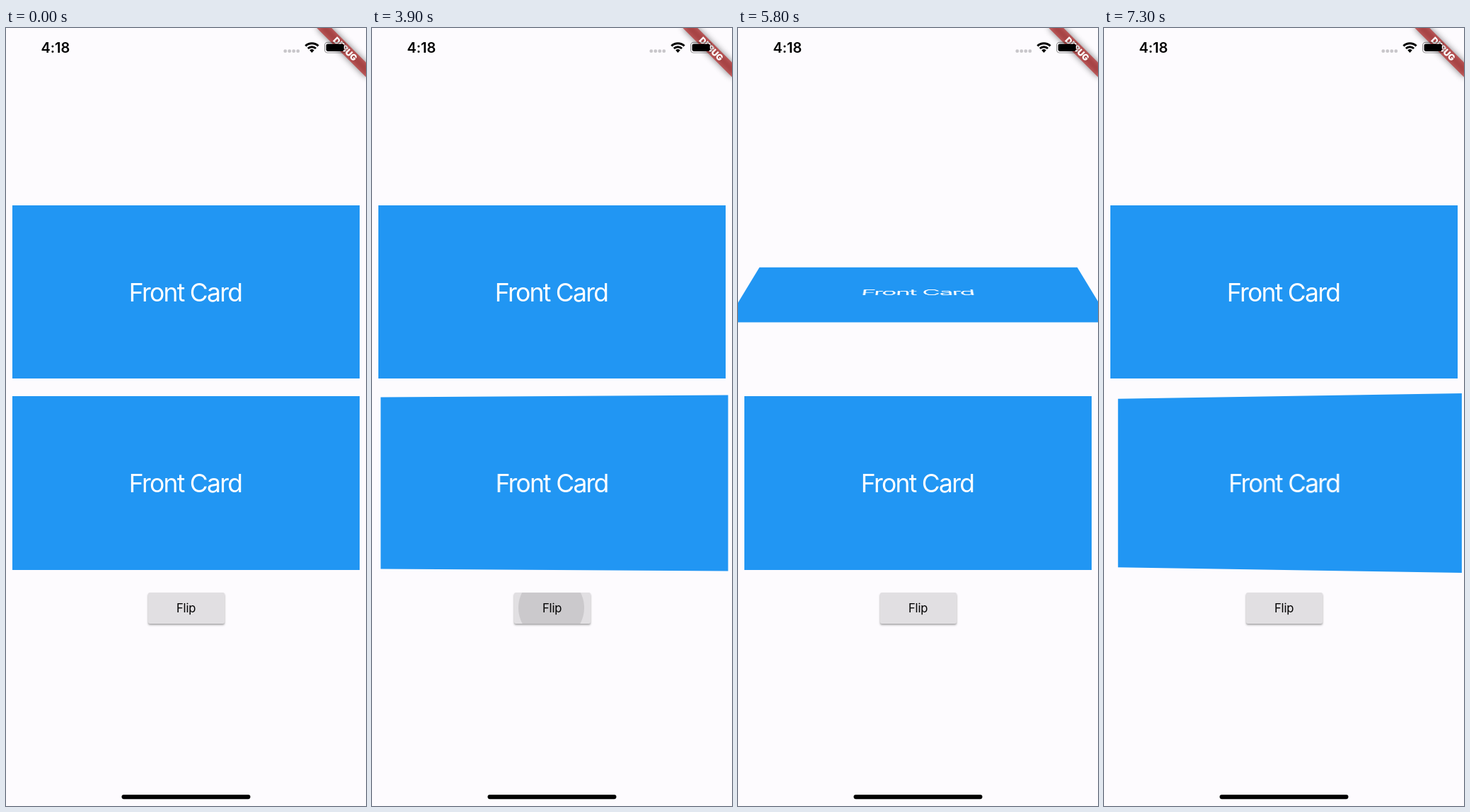
An HTML page for the animation above (7400 ms loop, 509 px wide and 1101 px high).

```html
<!DOCTYPE html>
<html lang="en">
<head>
<meta charset="utf-8">
<title>Flip cards</title>
<style>
  html, body { margin: 0; width: 100%; height: 100%; overflow: hidden; background: #fdfbfe; }
  body { position: relative; font-family: Inter, "Open Sans", sans-serif; }
  svg { position: absolute; left: 0; top: 0; }
  .card {
    position: absolute; left: 8.6px; width: 491.8px; height: 245.8px;
    background: #2196f3; color: #fff; text-align: center;
    font-size: 35.5px; line-height: 247.6px; letter-spacing: -1.75px; text-indent: -2px;
  }
  #top { top: 250.7px; }
  #bottom { top: 521px; }
  #button {
    position: absolute; left: 200.5px; top: 798.6px; width: 108.2px; height: 44.2px;
    border-radius: 2.5px; background: #e1dfe2; overflow: hidden;
    box-shadow: 0 2px 3px rgba(0, 0, 0, .28), 0 1px 2px rgba(0, 0, 0, .12);
    color: #000; text-align: center; font-size: 16.6px; line-height: 44.4px; letter-spacing: -.2px;
  }
  #button span { position: relative; }
  #ripple { position: absolute; left: 53px; top: 22px; border-radius: 50%; background: #000; }
</style>
</head>
<body>
<div class="card" id="top">Front Card</div>
<div class="card" id="bottom">Front Card</div>
<div id="button"><div id="ripple"></div><span>Flip</span></div>

<svg width="509" height="1101" viewBox="0 0 509 1101">
  <defs>
    <filter id="blur" x="-30%" y="-200%" width="160%" height="500%">
      <feGaussianBlur stdDeviation="4.6"/>
    </filter>
  </defs>
  <g transform="translate(509 0) rotate(45)">
    <rect x="-49.2" y="34.4" width="98.4" height="14.8" opacity=".5" filter="url(#blur)"/>
    <rect x="-49.2" y="34.4" width="98.4" height="14.8" fill="#b71c1c" fill-opacity=".63"/>
    <text y="46.2" font-size="12.3" font-weight="900" fill="#fff" text-anchor="middle" letter-spacing="-.2">DEBUG</text>
  </g>
  <text x="49.6" y="35" font-size="20" font-weight="600" letter-spacing="-.1">4:18</text>
  <g fill="#c8c6ca">
    <circle cx="394.8" cy="32.7" r="2.4"/>
    <circle cx="400.8" cy="32.7" r="2.4"/>
    <circle cx="406.8" cy="32.7" r="2.4"/>
    <circle cx="412.8" cy="32.7" r="2.4"/>
  </g>
  <g transform="translate(432.5 35)" fill="none" stroke="#000" stroke-width="3">
    <path d="M-9.1 -9.7A13.3 13.3 0 0 1 9.1 -9.7"/>
    <path d="M-5.6 -6A8.2 8.2 0 0 1 5.6 -6"/>
    <path d="M0 0L-3.2 -3.4A4.7 4.7 0 0 1 3.2 -3.4Z" fill="#000" stroke="none"/>
  </g>
  <rect x="450.6" y="20.4" width="29.4" height="14.6" rx="4" fill="none" stroke="#000" stroke-opacity=".4" stroke-width="1.2"/>
  <path d="M481.6 25.4q2.2 2.3 0 4.6z" fill-opacity=".4"/>
  <rect x="452.6" y="22.4" width="25.2" height="10.6" rx="2.4"/>
  <rect x="163.5" y="1085" width="182" height="6.2" rx="3.1"/>
</svg>

<script>
const LOOP = 7400, STEP = 100, FLIP = 500, FADE = 200;
const DEPTH = 1230; // perspective distance in px
const $ = id => document.getElementById(id);
const top_ = $('top'), bottom = $('bottom'), ripple = $('ripple');
const clamp = v => Math.min(1, Math.max(0, v));

// cubic-bezier(.42, 0, 1, 1)
function easeIn(x) {
  let lo = 0, hi = 1;
  for (let i = 0; i < 24; i++) {
    const s = (lo + hi) / 2, r = 1 - s;
    if (1.26 * s * r * r + 3 * s * s * r + s * s * s < x) lo = s; else hi = s;
  }
  return lo * lo * (3 - 2 * lo);
}

// The front turns away to 90 degrees, then the back comes in from -90.
const angle = q => q < .5 ? 90 * easeIn(2 * q) : -90 * easeIn(2 - 2 * q);

function turn(card, axis, t, there, back) {
  const q = clamp((t - there) / FLIP) - clamp((t - back) / FLIP);
  card.style.transform = q <= 0 || q >= 1 ? 'none'
    : `perspective(${DEPTH}px) rotate${axis}(${-angle(q)}deg)`;
}

function press(t, starts) {
  const age = starts.map(s => t - s).find(a => a >= 0 && a < FADE);
  const on = age !== undefined;
  ripple.style.opacity = on ? .12 * (1 - age / FADE) : 0;
  if (!on) return;
  const r = Math.min(59, 31 + age * .4);
  ripple.style.width = ripple.style.height = 2 * r + 'px';
  ripple.style.margin = `${-r}px 0 0 ${-r}px`;
}

function draw(now) {
  const t = Math.floor(now % LOOP / STEP) * STEP;
  turn(top_, 'X', t, 1065, 5582);
  turn(bottom, 'Y', t, 3862, 6866);
  press(t, [3862, 6866]);
}

const start = performance.now();
function tick() {
  draw(performance.now() - start);
  requestAnimationFrame(tick);
}
tick();
</script>
</body>
</html>
```
